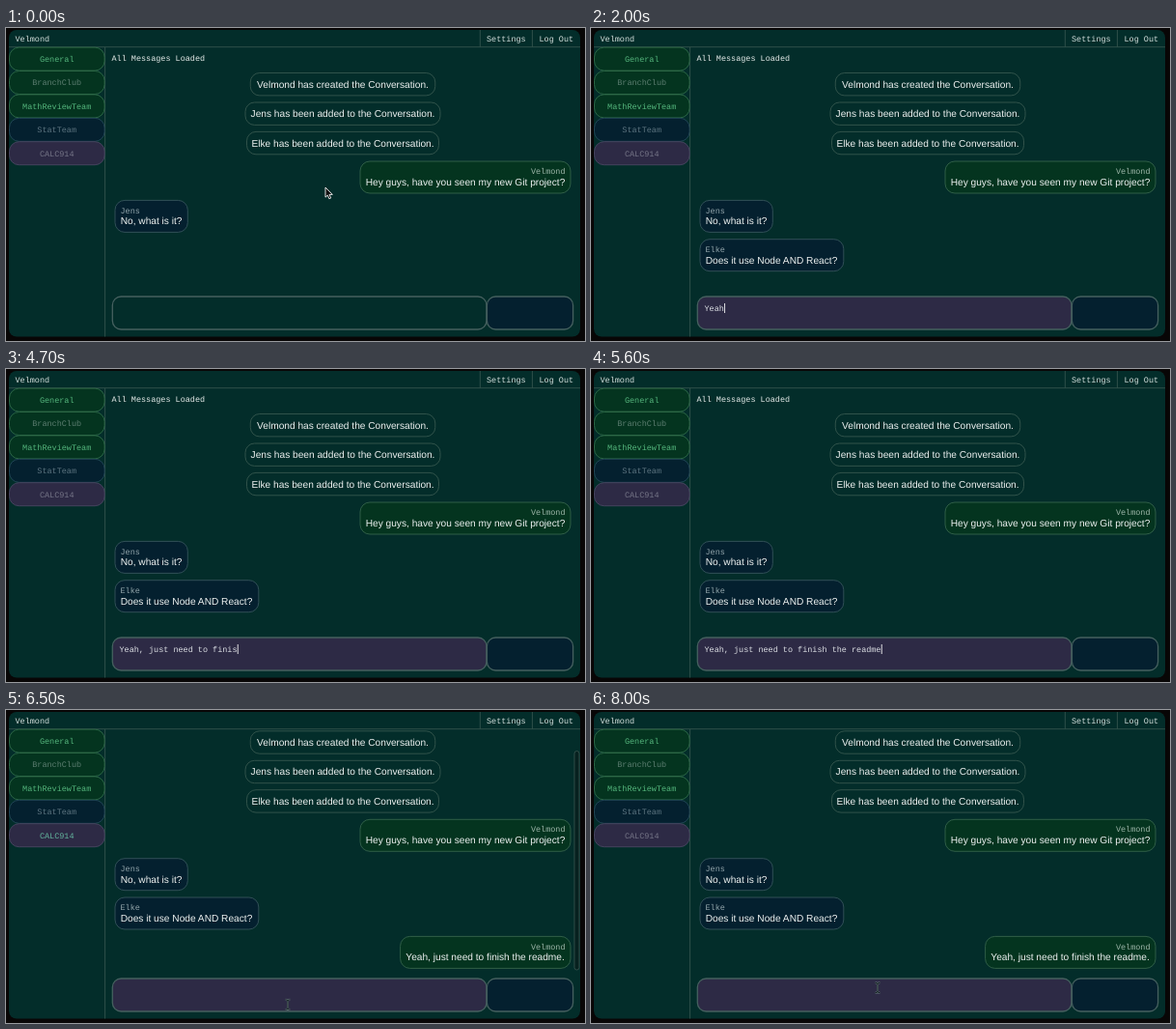
An HTML page that plays this animation: 600 px wide and 324 px high, repeating every 8.1 s.

```html
<!DOCTYPE html>
<html lang="en">
<head>
<meta charset="utf-8">
<title>Group chat</title>
<style>
  html, body { margin: 0; width: 100%; height: 100%; overflow: hidden; background: #080606; }
  svg { display: block; width: 600px; height: 324px; }
  text { white-space: pre; text-rendering: geometricPrecision; }
  .mono { font: 8.47px "Liberation Mono", monospace; }
  .sans { font: 10.17px "Liberation Sans", Arial, sans-serif; fill: #eef1f0; }
</style>
</head>
<body>
<svg id="stage" viewBox="0 0 600 324">
  <clipPath id="view"><rect x="103" y="21" width="492" height="249"/></clipPath>
</svg>
<script>
const LOOP = 8100, STEP = 100, CHAR = 5.082, SCROLL = 24.7;
const TEAL = '#032d2a', GREEN = '#04341f', NAVY = '#04202f', PURPLE = '#2d2a45', LINE = '#35554f';
const REPLY = 'Yeah, just need to finish the readme.';
const USER = 'Velmond';
const stage = document.getElementById('stage');

function add(parent, tag, attrs, content) {
  const node = document.createElementNS('http://www.w3.org/2000/svg', tag);
  for (const key in attrs) node.setAttribute(key, attrs[key]);
  if (content) node.textContent = content;
  parent.append(node);
  return node;
}

const box = (parent, x, y, width, height, rx, fill, stroke = 'none', lineWidth = 0.9) =>
  add(parent, 'rect', { x, y, width, height, rx, fill, stroke, 'stroke-width': lineWidth });

const mono = (parent, x, y, content, fill, anchor = 'start') =>
  add(parent, 'text', { class: 'mono', x, y, fill, 'text-anchor': anchor }, content);

const sans = (parent, x, y, content, anchor = 'start') =>
  add(parent, 'text', { class: 'sans', x, y, 'text-anchor': anchor }, content);

const rule = d => add(stage, 'path', { d, fill: 'none', stroke: LINE, 'stroke-width': 0.9 });

function notice(y, width, content) {
  box(messages, 349 - width / 2, y, width, 23.4, 9.5, 'none', '#36574f');
  sans(messages, 349, y + 15.2, content, 'middle');
}

function bubble(y, width, name, content, own) {
  const group = add(messages, 'g', {});
  const x = own ? 585 - width : 113;
  box(group, x, y, width, 33, 10, own ? GREEN : NAVY, own ? '#35644b' : '#36545c');
  mono(group, own ? 579.5 : 118.5, y + 13.2, name, own ? '#9db5a8' : '#93a5ab', own ? 'end' : 'start');
  sans(group, x + 5.7, y + 24.9, content);
  return group;
}

// Window frame and header
box(stage, 3, 2, 592, 317.5, 8, TEAL);
mono(stage, 9.5, 13.6, USER, '#d5dfdc');
mono(stage, 498, 13.6, 'Settings', '#d5dfdc');
mono(stage, 552.5, 13.6, 'Log Out', '#d5dfdc');
rule('M3 19.7H595M102.6 20V319.5M491.3 2V19.7M545.4 2V19.7');

// Sidebar
const channels = [
  ['General', GREEN, '#2f6b49', '#55b67d'],
  ['BranchClub', GREEN, '#2f6b49', '#5c7d70'],
  ['MathReviewTeam', GREEN, '#2f6b49', '#55b67d'],
  ['StatTeam', NAVY, '#24485a', '#5d7480'],
  ['CALC914', PURPLE, '#4a4763', '#747486']
].map(([name, fill, stroke, color], i) => {
  const y = 20.1 + i * 24.4;
  box(stage, 3.5, y, 98.6, 24, 10, fill, stroke);
  return mono(stage, 52.7, y + 14.8, name, color, 'middle');
});

// Conversation
const viewport = add(stage, 'g', { 'clip-path': 'url(#view)' });
const messages = add(viewport, 'g', {});
mono(messages, 109.5, 34, 'All Messages Loaded', '#e6ecea');
notice(46.5, 191.5, USER + ' has created the Conversation.');
notice(77, 202, 'Jens has been added to the Conversation.');
notice(107.4, 199, 'Elke has been added to the Conversation.');
bubble(138, 218, USER, 'Hey guys, have you seen my new Git project?', true);
bubble(178.4, 75.3, 'Jens', 'No, what is it?');
const question = bubble(218.7, 148.8, 'Elke', 'Does it use Node AND React?');
const reply = bubble(259.1, 176.4, USER, REPLY, true);
const scrollbar = box(stage, 589, 42.5, 5, 226.5, 2.5, '#07211f', '#3a5651', 0.8);

// Composer
const field = box(stage, 110.3, 278, 387.7, 34, 9, PURPLE);
box(stage, 110.3, 278, 387.7, 34, 9, 'none', '#46605f', 1.3);
box(stage, 498.4, 278, 89.2, 34, 9, NAVY, '#46605f', 1.3);
const typed = mono(stage, 117.5, 292.6, '', '#dcdfe4');
const caret = box(stage, 0, 285, 0.9, 10, 0, '#f2f2f2');

// Pointers, both centred on their hot spot
const arrow = add(stage, 'path', {
  d: 'M0 0V10.2L2.3 8.1L3.9 11.8L5.7 11L4.1 7.4H7.3Z',
  fill: '#101010', stroke: '#f4f4f4', 'stroke-width': 0.9, 'stroke-linejoin': 'round'
});
const beam = add(stage, 'g', {});
for (const [stroke, width] of [['#66757a', 2], ['#0a1618', 0.9]])
  add(beam, 'path', {
    d: 'M-2.4 -5.2Q0 -5.2 0 -3.6Q0 -5.2 2.4 -5.2M0 -3.6V3.6M-2.4 5.2Q0 5.2 0 3.6Q0 5.2 2.4 5.2',
    fill: 'none', stroke, 'stroke-width': width
  });

const clamp = v => Math.min(1, Math.max(0, v));
const progress = (t, from, to) => clamp((t - from) / (to - from));
const ease = p => p * p * (3 - 2 * p);
const mix = (a, b, p) => a + (b - a) * p;
const show = (node, on) => node.setAttribute('visibility', on ? 'visible' : 'hidden');

// Typing pace as [time, characters]
const hold = [[1800, 1], [1900, 3], [2000, 4], [2300, 3], [2500, 2], [2800, 3], [3000, 4], [3200, 5], [3300, 6]];
const pace = [[3400, 6], [4300, 16], [4700, 24], [5200, 32], [5700, 37]];

function typedCount(t) {
  if (t < 1800 || t >= 6000) return 0;
  if (t < 3400) return hold.filter(([at]) => at <= t).pop()[1];
  const next = pace.findIndex(([at]) => at > t);
  if (next < 0) return REPLY.length;
  const [t0, n0] = pace[next - 1], [t1, n1] = pace[next];
  return Math.round(mix(n0, n1, progress(t, t0, t1)));
}

function caretOn(t) {
  if (t < 1800) return t >= 1300 && t < 1600;
  if (t <= 6500) return t < 6300;
  return (t - 6500) % 1000 < 500;
}

function pointerAt(t) {
  if (t < 1200) {
    const p = ease(progress(t, 0, 800));
    return [mix(331, 308, p), mix(165, 303.5, p)];
  }
  if (t < 1800) {
    const p = progress(t, 1200, 1400);
    return [mix(308, 299, p), mix(303.5, 306, p)];
  }
  const p = ease(progress(t, 6500, 7000));
  return [mix(292, 297, p), mix(305, 287.5, p)];
}

function draw(t) {
  show(question, t >= 500);
  show(reply, t >= 6300);
  messages.setAttribute('transform', `translate(0 ${t >= 6500 ? -SCROLL : 0})`);
  scrollbar.setAttribute('opacity', t >= 6500 ? 1 - progress(t, 6800, 7000) : 0);
  channels[4].setAttribute('fill', t >= 6500 && t < 7200 ? '#62b39c' : '#747486');

  field.setAttribute('opacity', progress(t, 1200, 1400));
  const count = typedCount(t);
  typed.textContent = REPLY.slice(0, count);
  caret.setAttribute('x', 117.8 + count * CHAR);
  show(caret, caretOn(t));

  const [x, y] = pointerAt(t);
  const visible = t < 1800 || t >= 6500;
  for (const pointer of [arrow, beam]) pointer.setAttribute('transform', `translate(${x} ${y})`);
  show(arrow, visible && y < 278);
  show(beam, visible && y >= 278);
}

const start = performance.now();
function frame() {
  const t = (performance.now() - start) % LOOP;
  draw(Math.floor(t / STEP) * STEP);
  requestAnimationFrame(frame);
}
frame();
</script>
</body>
</html>
```
